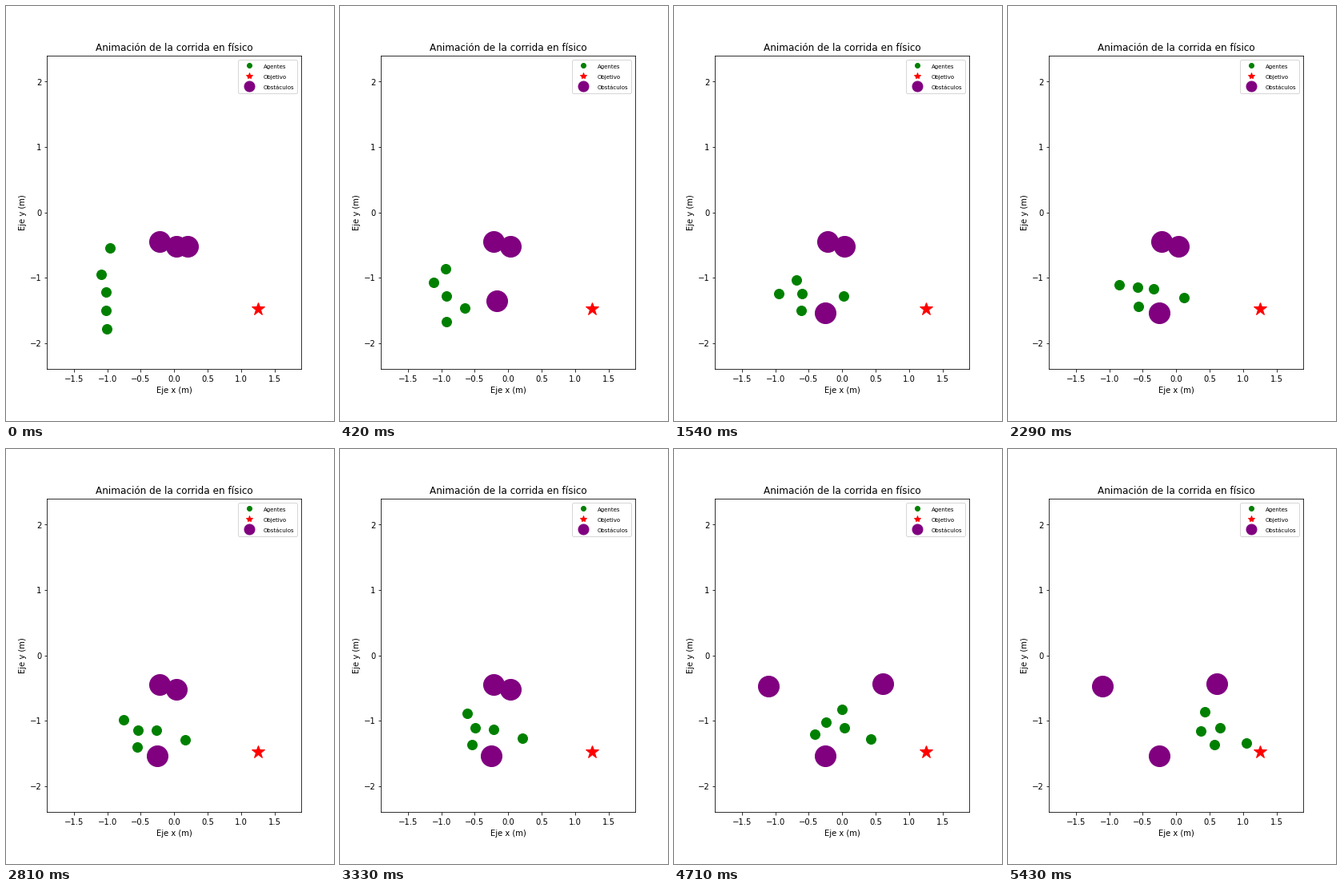
A matplotlib script that plays this animation: 410 px wide and 518 px high, repeating every 5450 ms.

```python
import numpy as np
import matplotlib.pyplot as plt
from matplotlib.animation import FuncAnimation

LOOP, STEP = 5450, 25  # ms

# Each agent follows a smooth curve through a few points x + yj (metres)
KEYS = np.array([0, 800, 1525, 2275, 3325, 4700, 5425])
PATHS = np.array([
    [-.96-.54j, -.9-1.097j, -.685-1.033j, -.577-1.145j, -.493-1.107j, -.243-1.023j, .367-1.157j],
    [-1.09-.95j, -1.115-1.17j, -.947-1.243j, -.852-1.108j, -.613-.887j, -.004-.827j, .427-.863j],
    [-1.02-1.22j, -.816-1.328j, -.6-1.243j, -.338-1.17j, -.219-1.133j, .032-1.108j, .654-1.108j],
    [-1.025-1.5j, -.314-1.427j, .02-1.28j, .116-1.305j, .215-1.267j, .427-1.282j, 1.048-1.342j],
    [-1.007-1.785j, -.828-1.573j, -.613-1.5j, -.565-1.438j, -.541-1.367j, -.41-1.207j, .57-1.367j],
])
SLOPES = np.gradient(PATHS, KEYS, axis=1)


def swarm(t):
    """Cubic Hermite position of every agent."""
    k = np.clip(np.searchsorted(KEYS, t, "right") - 1, 0, len(KEYS) - 2)
    span = KEYS[k + 1] - KEYS[k]
    u = min((t - KEYS[k]) / span, 1)
    ease = u * u * (3 - 2 * u)
    return (PATHS[:, k] * (1 - ease) + PATHS[:, k + 1] * ease
            + span * u * (1 - u) * (SLOPES[:, k] * (1 - u) - SLOPES[:, k + 1] * u))


def glide(t, start, end, t0, t1, lift=0):
    u = np.clip((t - t0) / (t1 - t0), 0, 1)
    return start + (end - start) * u + 1j * lift * np.sin(np.pi * u)


def blocks(t):
    return np.array([
        glide(t, -.218-.445j, -1.1-.47j, 4000, 4400, lift=.1),
        glide(t, .033-.52j, .61-.435j, 4000, 4400),
        glide(t, .2-.52j, -.253-1.535j, 120, 460),
    ])


fig, ax = plt.subplots(figsize=(5.7, 7.2), dpi=72)
fig.subplots_adjust(left=.125, right=.9, bottom=.125, top=.88)
ax.set(xlim=(-1.9, 1.9), ylim=(-2.4, 2.4),
       xticks=np.arange(-1.5, 1.6, .5), yticks=range(-2, 3),
       xlabel="Eje x (m)", ylabel="Eje y (m)")
ax.set_title("Animación de la corrida en físico")

agents, = ax.plot([], [], "o", color="green", ms=12, zorder=4, label="Agentes")
ax.plot([1.25], [-1.475], "*", color="red", ms=17, zorder=3, label="Objetivo")
obstacles, = ax.plot([], [], "o", color="purple", ms=26, label="Obstáculos")

legend = ax.legend(loc="upper right", markerscale=.5)
plt.setp(legend.get_texts(), fontsize=7)


def update(i):
    for dots, where in ((agents, swarm), (obstacles, blocks)):
        z = where(i * STEP)
        dots.set_data(z.real, z.imag)
    return agents, obstacles


anim = FuncAnimation(fig, update, frames=LOOP // STEP, interval=STEP,
                     repeat=True, repeat_delay=0)
plt.show()
```
